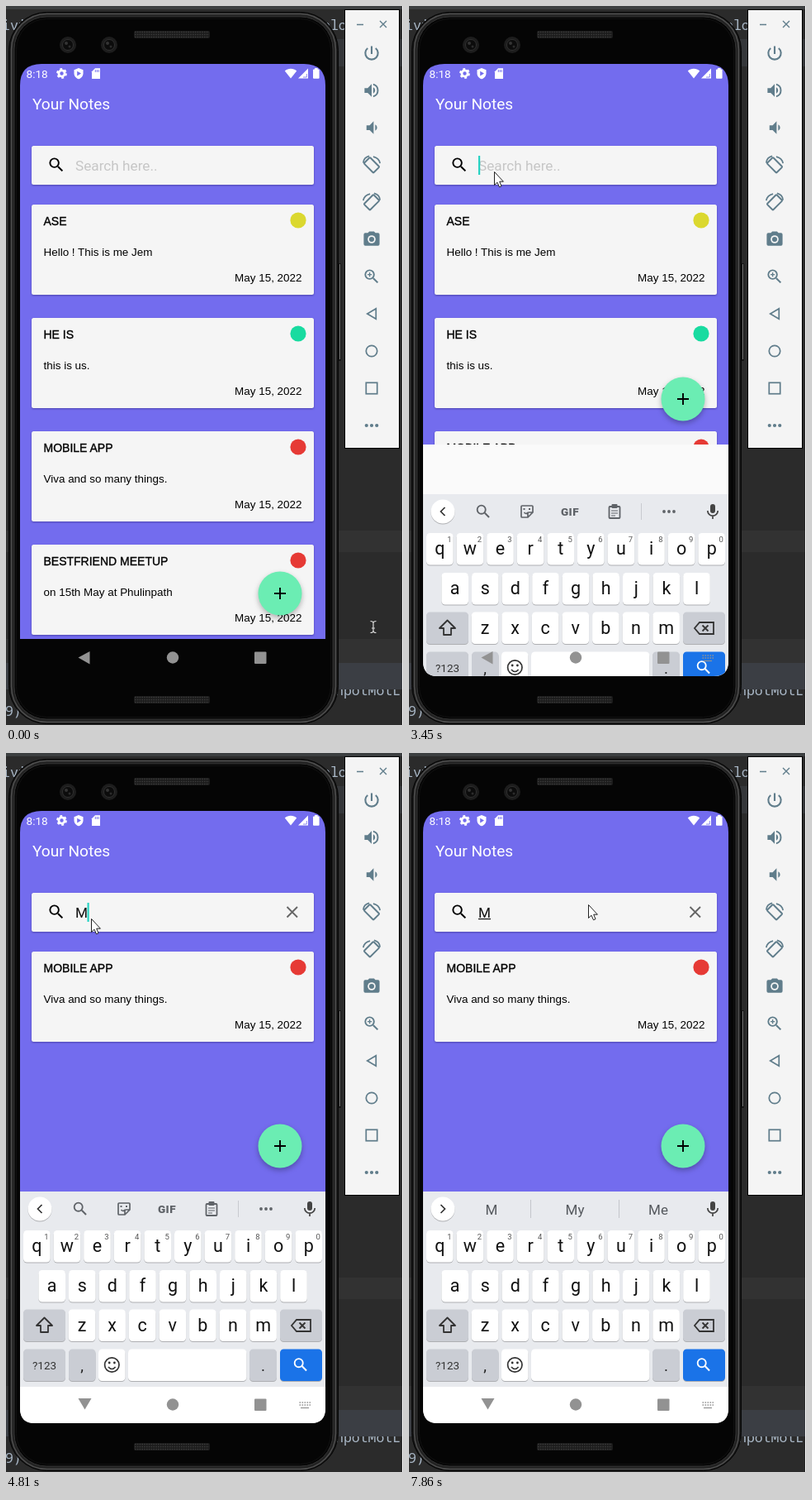
An HTML page that plays this animation: 481x869 px, repeating every 8 s.

```html
<!DOCTYPE html>
<html lang="en">
<head>
<meta charset="utf-8">
<title>Notes search</title>
<style>
html, body { margin: 0; width: 100%; height: 100%; overflow: hidden; background: #2b2b2b; }
svg { display: block; width: 481px; height: 869px; }
text { font-family: Roboto, sans-serif; white-space: pre; }
.body { font-family: "Liberation Sans", Arial, sans-serif; font-size: 13.45px; }
.title { font-family: "Liberation Sans", Arial, sans-serif; font-size: 14px; stroke: #000; stroke-width: .35; }
.mono { font-family: "Noto Sans Mono", monospace; font-size: 16.5px; fill: #a9b7c6; }
.mid { text-anchor: middle; }
.line { fill: none; }
.card { filter: drop-shadow(0 1px 1px rgba(20, 10, 80, .4)); }
.fab { filter: drop-shadow(0 3px 3px rgba(0, 0, 0, .28)); }
.key { filter: drop-shadow(0 1px 0 rgba(0, 0, 0, .25)); }
</style>
</head>
<body>
<svg id="stage" viewBox="0 0 481 869" xmlns="http://www.w3.org/2000/svg"></svg>
<script>
const LOOP = 8000;
const PURPLE = '#736cee', PAPER = '#f5f5f5', SLATE = '#607d8b', GREY = '#5f6368', NAV = '#929292';

const rect = (x, y, w, h, fill, rx = 0, more = '') =>
  `<rect x="${x}" y="${y}" width="${w}" height="${h}" rx="${rx}" fill="${fill}" ${more}/>`;
const disc = (x, y, r, fill, more = '') => `<circle cx="${x}" cy="${y}" r="${r}" fill="${fill}" ${more}/>`;
const path = (d, fill, more = '') => `<path d="${d}" fill="${fill}" ${more}/>`;
const line = (d, color, width = 2, more = '') =>
  `<path class="line" d="${d}" stroke="${color}" stroke-width="${width}" ${more}/>`;
const text = (x, y, s, size, fill, more = '') =>
  `<text x="${x}" y="${y}" font-size="${size}" fill="${fill}" ${more}>${s}</text>`;
const group = (id, body, more = '') => `<g id="${id}" ${more}>${body}</g>`;
// Places a 24 unit icon around a centre.
const icon = (x, y, size, body) =>
  `<g transform="translate(${x} ${y}) scale(${size / 24}) translate(-12 -12)">${body}</g>`;

const lens = color => disc(9.5, 9.5, 5.5, 'none', `stroke="${color}" stroke-width="2"`) +
  line('M14 14L19.7 19.7', color, 2.2);
const speaker = 'M3 9v6h4l5 5V4L7 9z';
const wave = 'M14 8a4.5 4.5 0 0 1 0 8z';

function backdrop() {
  return rect(0, 0, 480, 869, '#2b2b2b') + rect(480, 0, 1, 869, '#fff') +
    rect(0, 0, 480, 4, '#3c3f41') + rect(400, 40, 80, 33, '#35373a') +
    rect(0, 634, 480, 26, '#323232') + rect(0, 765, 480, 29, '#323232') +
    text(-5, 29, 'ivi', 16, '#a9b7c6', 'class="mono"') +
    text(383, 29, 'olor', 16, '#a9b7c6', 'class="mono"') +
    text(399, 833, 'npotMotL', 16, '#a9b7c6', 'class="mono"') +
    text(-11, 858, '39)', 16, '#a9b7c6', 'class="mono"') +
    rect(0, 794, 480, 32, '#3b3e44');
}

function grille(y) {
  let s = rect(155, y, 92, 9, '#1b1b1b', 2);
  for (let i = 0; i < 3; i++) s += line(`M156 ${y + 1.5 + i * 3}H246`, '#3a3a3a', 1.4, 'stroke-dasharray="1.6 1.2"');
  return s;
}

function phone() {
  const lensRing = x => disc(x, 47, 10, '#1d1d1d') + disc(x, 47, 6.5, '#0c0c0c', 'stroke="#303030"') +
    disc(x - 2, 45, 2, '#343434') + disc(x + 2, 49, 1.5, '#2c2c2c');
  return rect(402, 311, 4, 118, '#151515', 1) + line('M404.5 312V427', '#777', 1) +
    rect(3.5, 7.5, 399, 860, '#151515', 46, 'stroke="#060606"') +
    rect(6.5, 9.5, 393, 856, '#222', 43, 'stroke="#505050" stroke-width="1.5"') +
    rect(10, 13, 386, 849, '#050505', 39, 'stroke="#343434"') +
    rect(12.5, 15.5, 381, 844, '#050505', 37, 'stroke="#111"') +
    lensRing(75) + lensRing(125) + grille(30) + grille(834);
}

function toolPanel() {
  const s = SLATE;
  const tilt = flip => `<g transform="${flip ? 'translate(24 0) scale(-1 1)' : ''}">` +
    rect(6.6, 3.8, 10.8, 17, 'none', 1, `stroke="${s}" stroke-width="2" transform="rotate(-45 12 12.3)"`) +
    line('M1.4 9.5C1.8 5 4.5 2 9 1M14 1.6C18.8 2.6 21.8 5.6 22.6 10', s, 1.8) + '</g>';
  const items = [
    line('M12 3V13M7 5.7a8 8 0 1 0 10 0', s, 2.2),
    path(speaker + wave, s) + line('M14 4.3a8 8 0 0 1 0 15.4', s, 2),
    `<g transform="translate(2.5 0)">${path(speaker + wave, s)}</g>`,
    tilt(false),
    tilt(true),
    path('M9 2L7.2 4H4a2 2 0 0 0-2 2v12a2 2 0 0 0 2 2h16a2 2 0 0 0 2-2V6a2 2 0 0 0-2-2h-3.2L15 2z', s) +
      disc(12, 12, 5, PAPER) + disc(12, 12, 3.2, s),
    lens(s) + line('M9.5 6.8V12.2M6.8 9.5H12.2', s, 1.4),
    line('M17.5 5.5V18.5L6.5 12z', s, 1.8),
    disc(12, 12, 7, 'none', `stroke="${s}" stroke-width="1.8"`),
    rect(5, 5, 14, 14, 'none', 0, `stroke="${s}" stroke-width="1.8"`),
    [5.5, 12, 18.5].map(x => disc(x, 12, 2.2, s)).join('')
  ];
  return rect(410.5, 4.5, 66, 530, '#f4f4f4', 0, 'stroke="#000"') +
    line('M425 22.5H433M453 18L461 26M461 18L453 26', s, 1.4) +
    items.map((b, i) => icon(443, 57 + i * 45, 23, b)).join('');
}

function statusBar() {
  return text(24.5, 86.5, '8:18', 13.6, '#fff') +
    disc(67.5, 81.5, 3.6, 'none', 'stroke="#fff" stroke-width="2.8"') +
    disc(67.5, 81.5, 5.4, 'none', 'stroke="#fff" stroke-width="2" stroke-dasharray="2.8 2.85"') +
    path('M88 75L93.5 77.3V81.2C93.5 84.6 91.2 87.3 88 88.3C84.8 87.3 82.5 84.6 82.5 81.2V77.3z', '#fff') +
    path('M86.2 78.8V84.4L91 81.6z', PURPLE) +
    path('M108 75.3H114V88H104V79.2z', '#fff') +
    line('M108.3 77V80M110.3 77V80M112.2 77V80', PURPLE, .9) +
    path('M345 87.5L337.8 78.4C341.8 74.9 348.2 74.9 352.2 78.4z', '#fff') +
    path('M366 75.5V87.5H354z', '#fff') + line('M364.3 82V86H360', PURPLE, .8) +
    rect(372, 76.5, 7.6, 11.3, '#fff', 1) + rect(374, 75, 3.6, 2, '#fff');
}

const notes = [
  ['ASE', 'Hello ! This is me Jem', '#dbd82f'],
  ['HE IS', 'this is us.', '#18dba0'],
  ['MOBILE APP', 'Viva and so many things.', '#e63a35'],
  ['BESTFRIEND MEETUP', 'on 15th May at Phulinpath', '#e63a35']
];
const noteCard = ([title, body, color], i) => `<g transform="translate(0 ${i * 137})">` +
  rect(31, 240, 342, 109, PAPER, 2.5, 'class="card"') +
  text(45.5, 265, title, 14, '#000', 'class="title"') +
  text(45.5, 301.5, body, 13.45, '#000', 'class="body"') +
  text(358.5, 333, 'May 15, 2022', 13.45, '#000', 'class="body" text-anchor="end"') +
  disc(354, 259, 9.6, color) + '</g>';

function app() {
  return rect(17, 70, 370, 695, PURPLE) + statusBar() +
    text(32, 125, 'Your Notes', 19.1, '#fff') +
    rect(31, 169, 342, 47, PAPER, 2.5, 'class="card"') +
    icon(61, 192, 23, lens('#000')) +
    group('hint', text(84, 199, 'Search here..', 17.2, '#c6c6c6')) +
    group('typed', text(84, 199, 'M', 17.2, '#111') + line('M340.5 186L353 198.5M353 186L340.5 198.5', '#666', 1.9)) +
    group('underline', rect(84, 200, 15, 1.2, '#111')) +
    group('caret', rect(0, 181, 2.2, 23, '#27d3c3')) +
    group('allNotes', notes.map(noteCard).join('')) +
    group('found', noteCard(notes[2], 0)) +
    group('fab', disc(332, 710, 26.5, '#6bedb3', 'class="fab"') + line('M325 710H339M332 703V717', '#000', 1.9));
}

const LIGHT = '#fff', DIM = '#cacdd4';
const key = (x, y, w, fill) => rect(x, y, w, 38.5, fill, 4.5, 'class="key"');
function letters(row, x0, y, hints) {
  return [...row].map((c, i) => {
    const x = x0 + i * 36.6;
    return key(x - 16.3, y, 32.6, LIGHT) + text(x, y + 26, c, 21.5, '#111', 'class="mid"') +
      (hints ? text(x + 11.5, y + 11, (i + 1) % 10, 9.5, '#555', 'class="mid"') : '');
  }).join('');
}

function keyboard() {
  const g = GREY;
  const mic = rect(365, 542, 6, 11, '#444', 3) + line('M361.8 550a6.2 6.2 0 0 0 12.4 0M368 556V560', '#444', 1.7);
  const tools = line('M43.5 546L38.5 551L43.5 556', '#333', 1.7) + icon(90, 551, 22, lens(g)) +
    line('M137 544H149Q150 544 150 545V552L144 558H137Q136 558 136 557V545Q136 544 137 544M150 552H145Q144 552 144 553V558M139.5 552Q142 555 144 552', g, 1.7) +
    rect(138.5, 547, 2, 2, g) + rect(145, 547, 2, 2, g) +
    text(195, 555.5, 'GIF', 13.5, g, 'class="mid" font-weight="900" letter-spacing=".5"') +
    rect(242.5, 545, 13, 14, 'none', 1, `stroke="${g}" stroke-width="1.8"`) + rect(245.5, 542, 7, 5, g, 1) +
    line('M245 550H253M245 553H253M245 556H250', g, 1.2) +
    line('M281.5 541V561', '#c8cacf', 1) + [309, 315, 321].map(x => disc(x, 551, 1.9, g)).join('');
  const words = line('M38.5 546L43.5 551L38.5 556', '#333', 1.7) +
    ['M', 'My', 'Me'].map((w, i) => text(100 + i * 101, 557.5, w, 17, '#55595e', 'class="mid"')).join('') +
    line('M147.5 540V562M254.5 540V562', '#c4c6cb', 1);
  return rect(17, 530, 370, 236, '#e8eaee') + rect(17, 766, 370, 45, '#fff') +
    disc(41, 551, 14.5, '#fff', 'class="key"') + mic +
    group('tools', tools) + group('words', words) +
    letters('qwertyuiop', 37.3, 577, true) + letters('asdfghjkl', 55.7, 625) +
    key(21, 672.5, 51, DIM) + letters('zxcvbnm', 92, 672.5) + key(332, 672.5, 51, DIM) +
    line('M46.5 682.5L56 692H51V700H42V692H37z', '#333', 1.8, 'stroke-linejoin="round"') +
    line('M352 685H369V699H352L346 692zM355.5 688.5L362.5 695.5M362.5 688.5L355.5 695.5', '#333', 1.8) +
    key(21, 720.5, 51, DIM) + text(46.5, 744.5, '?123', 13.5, '#333', 'class="mid"') +
    key(76, 720.5, 32.5, DIM) + text(92, 747, ',', 19, '#222', 'class="mid"') +
    key(112, 720.5, 32.5, LIGHT) + disc(128.3, 739.5, 8.7, 'none', 'stroke="#333" stroke-width="1.7"') +
    disc(125.2, 737, 1.4, '#333') + disc(131.4, 737, 1.4, '#333') + line('M124 742Q128.3 747 132.6 742', '#333', 1.7) +
    key(148, 720.5, 143.5, LIGHT) + key(295, 720.5, 33, DIM) + text(311.5, 747, '.', 19, '#222', 'class="mid"') +
    key(332, 720.5, 51, '#1a73e8') + icon(357, 739.5, 22, lens('#fff'));
}

function navBar() {
  let dots = line('M357 791.5H367', NAV, 1.2);
  for (const y of [785, 788]) dots += line(`M355.5 ${y}H369`, NAV, 1.5, 'stroke-dasharray="1.6 1.4"');
  return `<path id="back" fill="${NAV}"/>` + disc(202, 787.5, 7.2, NAV) + rect(301, 780.5, 14.5, 14.5, NAV, 1) +
    group('switch', dots);
}

const stage = document.getElementById('stage');
stage.innerHTML = `<defs>
  <clipPath id="appClip"><path d="M17 765V96Q17 70 43 70H361Q387 70 387 96V765z"/></clipPath>
  <clipPath id="imeClip"><path d="M17 500H387V792Q387 810 369 810H35Q17 810 17 792z"/></clipPath></defs>` +
  backdrop() + phone() + group('screen', app(), 'clip-path="url(#appClip)"') +
  group('ime', rect(17, 530, 370, 281, '#fafafa') + group('keys', keyboard()), 'clip-path="url(#imeClip)"') +
  navBar() + toolPanel() +
  group('beam', line('M441.5 743.5Q445 743.5 445 746V755Q445 757.5 441.5 757.5M448.5 743.5Q445 743.5 445 746M448.5 757.5Q445 757.5 445 755M443 752H447', '#ddd', 1.2)) +
  group('arrow', path('M.5 .5V16.5L4 13.2L6.5 18.8L9 17.7L6.7 12.2H11.4z', '#fff', 'stroke="#222" stroke-width="1"'));

// Each step holds from its time until the next one.
const pointer = [
  [950, 425, 725], [1070, 385, 672], [1190, 335, 610], [1310, 282, 543], [1460, 228, 362],
  [1610, 218, 283], [2040, 206, 264], [2170, 185, 232], [2320, 165, 205], [2450, 147, 182],
  [2590, 122, 190], [2710, 103, 200], [6350, 127, 220], [6480, 155, 258], [6600, 187, 298],
  [6750, 190, 322], [6900, 187, 325], [7330, 184, 300], [7450, 175, 255], [7570, 164, 209],
  [7720, 152, 185], [7860, 217, 183]
];
const blink = [[0, 0], [3160, 1], [3600, 0], [4150, 1], [5330, 0], [5960, 1], [6480, 0], [7050, 1], [7450, 0]];
const slide = [[0, 60], [3600, 0]];
const back = [
  [0, 'M87.5 787.5L101.5 780V795.5z'],
  [3600, 'M89.5 778L104.5 784L92 794z'],
  [3750, 'M87.5 780H103.5L95.5 793.5z']
];

const at = (steps, t) => steps.reduce((now, s) => s[0] <= t ? s : now, steps[0]);
const el = id => document.getElementById(id);
const show = (id, on) => el(id).setAttribute('display', on ? 'inline' : 'none');
const move = (id, x, y) => el(id).setAttribute('transform', `translate(${x} ${y})`);

function draw(t) {
  const typed = t >= 4680, found = t >= 4810, suggest = t >= 5070, open = t >= 3450;
  const [, x, y] = at(pointer, t);
  show('beam', t < 950);
  show('arrow', t >= 950);
  move('arrow', x, y);
  show('hint', !typed);
  show('typed', typed);
  show('underline', suggest);
  show('caret', at(blink, t)[1]);
  move('caret', typed ? 98.5 : 84, 0);
  show('allNotes', !found);
  show('found', found);
  move('fab', 0, open ? -235 : 0);
  show('ime', open);
  move('keys', 0, at(slide, t)[1]);
  show('tools', !suggest);
  show('words', suggest);
  show('switch', t >= 3300);
  el('back').setAttribute('d', at(back, t)[1]);
}

const start = performance.now();
function tick() {
  draw((performance.now() - start) % LOOP);
  requestAnimationFrame(tick);
}
tick();
</script>
</body>
</html>
```
